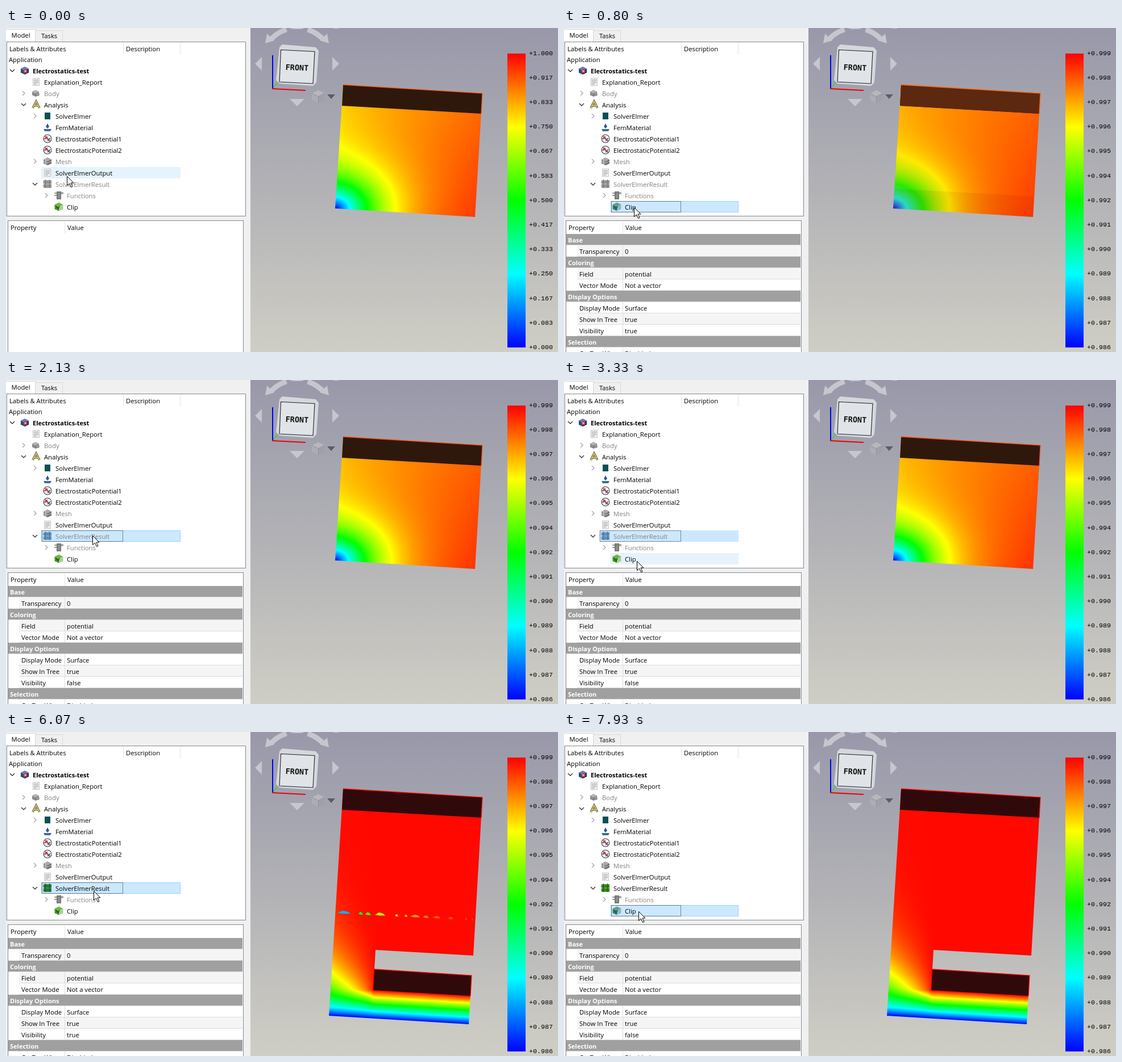
Animation, 971 px wide and 571 px high, one loop 8000 ms. Source, as an HTML page with a canvas:

```html
<!DOCTYPE html>
<html lang="en">
<head>
<meta charset="utf-8">
<title>Electrostatics-test</title>
<style>
html, body { margin: 0; width: 100%; height: 100%; overflow: hidden; background: #f0f0f0 }
canvas { display: block }
</style>
</head>
<body>
<canvas id="stage" width="971" height="571"></canvas>
<script>
const W = 971, H = 571, LOOP = 8000, STEP = 1000 / 15;
const UI = '11.25px "Open Sans", "Noto Sans", sans-serif';
const BOLD = 'bold 11px "Open Sans", "Noto Sans", sans-serif';
const MONO = '11.67px "Liberation Mono", monospace';
let g = document.getElementById('stage').getContext('2d');

const clamp = (v, a = 0, b = 1) => Math.min(b, Math.max(a, v));
const lerp = (a, b, k) => a + (b - a) * k;

function rect(x, y, w, h, color) { g.fillStyle = color; g.fillRect(x, y, w, h); }
function frame(x, y, w, h, color) { g.lineWidth = 1; g.strokeStyle = color; g.strokeRect(x + .5, y + .5, w - 1, h - 1); }
function text(s, x, y, color = '#000', font = UI) { g.font = font; g.fillStyle = color; g.fillText(s, x, y); }
function trace(p, close = true) {
  g.beginPath();
  for (let i = 0; i < p.length; i += 2) g.lineTo(p[i], p[i + 1]);
  if (close) g.closePath();
}
function poly(p, color) { trace(p); g.fillStyle = color; g.fill(); }
function line(p, color, width = 1, close = false) {
  trace(p, close); g.strokeStyle = color; g.lineWidth = width; g.stroke();
}
function disc(x, y, r, color) { g.beginPath(); g.arc(x, y, r, 0, 7); g.fillStyle = color; g.fill(); }
function layer(draw) {
  const c = document.createElement('canvas'), main = g;
  c.width = W; c.height = H;
  g = c.getContext('2d');
  draw();
  g = main;
  return c;
}

// ---- potential field ----
const CLIP = [593, 100, 838, 115, 825, 333, 579, 318];
const FULL = [593, 100, 838, 115, 822, 394, 650, 384, 648, 418, 819, 429, 814, 515, 568, 500];
const TOP_BAR = [593, 100, 838, 115, 836, 151, 591, 137];
const LOW_BAR = [648, 418, 819, 429, 817, 465, 646, 455];

// coordinates along the lower and left edges of the clipped block
function toUV(x, y) {
  const dx = x - 579, dy = y - 318;
  return [(218 * dx + 14 * dy) / 53838, (15 * dx - 246 * dy) / 53838];
}
function clipField(u, v) {
  return .8 * Math.tanh(Math.hypot(u * 185, v * 218) / 65) + .15 * Math.max(0, u) ** .8 * (1 - .4 * v);
}
function fineClipField(u, v) {
  const p = clipField(u, v);
  return p + .12 * p * (1 - p);
}
function fullField(u, v) {
  const d = Math.max(0, (v + .835) * 218), side = clamp((.307 - u) / .307);
  const blend = side ** clamp(.4 + d / 150, .5, 2);
  return lerp(Math.min(1, d / 50), 1 - Math.exp(-d / 55), blend) - .008;
}
function rainbow(p) {
  const q = 4 * clamp(p);
  return [clamp(q - 2), clamp(Math.min(q, 4 - q)), clamp(2 - q)].map(c => Math.round(255 * c));
}
function fieldImage(field) {
  return layer(() => {
    const x0 = 560, y0 = 95, w = 285, h = 425, img = g.createImageData(w, h);
    for (let y = 0, i = 0; y < h; y++) for (let x = 0; x < w; x++, i += 4) {
      img.data.set([...rainbow(field(...toUV(x0 + x, y0 + y))), 255], i);
    }
    g.putImageData(img, x0, y0);
  });
}
function block(shape, field, barColor, edge, bars) {
  const image = fieldImage(field);
  return layer(() => {
    g.save(); trace(shape); g.clip(); g.drawImage(image, 0, 0); g.restore();
    for (const bar of bars) { poly(bar, barColor); line(bar.slice(0, 6), edge, 1.3); }
  });
}
const coarseClip = block(CLIP, clipField, '#2e180c', '#ff5a14', [TOP_BAR]);
const fineClip = block(CLIP, fineClipField, '#2e180c', '#ff4a10', [TOP_BAR]);
const fullBlock = block(FULL, fullField, '#300a0a', '#ff0808', [TOP_BAR, LOW_BAR]);
const clearClip = layer(() => {
  g.drawImage(fineClip, 0, 0);
  poly(CLIP, 'rgba(255,110,0,.15)');
  poly(TOP_BAR, '#5c2810');
  poly([581, 283, 827, 297, 825, 333, 579, 318], 'rgba(110,10,0,.08)');
  line(TOP_BAR.slice(0, 6), '#ff6a10', 1.3);
});
// slivers of the clipped face that show through the full block
const slivers = layer(() => {
  const spans = [583, 23, 620, 8, 632, 10, 649, 18, 684, 6, 701, 5, 711, 17, 733, 11, 751, 13, 777, 10, 807, 4, 819, 3];
  for (let i = 0; i < spans.length; i += 2) {
    const x = spans[i], w = spans[i + 1], y = 317.5 + (x - 579) * .05, h = x < 670 ? 4 : 3;
    poly([x, y + 1, x + w * .4, y - h + 1, x + w * .8, y - 1, x + w, y + 2.5, x + w * .4, y + 2.5],
      `rgb(${rainbow(fineClipField((x + w / 2 - 579) / 246, 0))})`);
  }
});

// ---- tree ----
const ROWS = [
  ['Application', 5],
  ['Electrostatics-test', 47, 'open', docIcon],
  ['Explanation_Report', 67, '', pageIcon],
  ['Body', 67, 'shut', bodyIcon, true],
  ['Analysis', 67, 'open', analysisIcon],
  ['SolverElmer', 87, 'shut', solverIcon],
  ['FemMaterial', 87, '', materialIcon],
  ['ElectrostaticPotential1', 87, '', potentialIcon],
  ['ElectrostaticPotential2', 87, '', potentialIcon],
  ['Mesh', 87, 'shut', meshIcon, true],
  ['SolverElmerOutput', 87, '', pageIcon],
  ['SolverElmerResult', 87, 'open', resultIcon, true],
  ['Functions', 107, 'shut', functionIcon, true],
  ['Clip', 107, '', clipIcon]
];
const RESULT = 11, CLIP_ROW = 13;

function cube(x, y, r, top, left, right) {
  poly([x, y - r, x + r, y - r * .5, x, y, x - r, y - r * .5], top);
  poly([x - r, y - r * .5, x, y, x, y + r, x - r, y + r * .55], left);
  poly([x + r, y - r * .5, x, y, x, y + r, x + r, y + r * .55], right);
}
function docIcon(x, y) {
  cube(x, y, 7, '#5b7fb5', '#28487c', '#1b2f58');
  disc(x + 1, y + 1, 3.5, '#d8433a');
  disc(x + 1, y + 1, 1.3, '#f2d9d9');
}
function pageIcon(x, y) {
  rect(x - 6, y - 7, 12, 14, '#f2f2f0');
  frame(x - 6, y - 7, 12, 14, '#c2c2c0');
  for (let i = 0; i < 4; i++) rect(x - 4, y - 4 + i * 2.5, i === 3 ? 5 : 8, 1, '#999');
}
function bodyIcon(x, y) {
  cube(x - 1, y, 6, '#b5b5b5', '#8c8c8c', '#777');
  disc(x + 3, y + 2, 3, '#999');
}
function analysisIcon(x, y) {
  for (const [c, w] of [['#4a4418', 3.4], ['#efe08a', 1.6]]) {
    line([x - 6, y + 6, x, y - 6, x + 6, y + 6], c, w);
    line([x - 3, y + 2, x + 4, y + 2], c, w);
  }
}
function solverIcon(x, y) { rect(x - 5, y - 6, 10, 12, '#0d4f59'); }
function materialIcon(x, y) {
  poly([x - 7, y + 3, x + 7, y + 3, x + 5, y + 7, x - 5, y + 7], '#3b6ea5');
  poly([x, y - 7, x + 3, y - 1, x, y + 2, x - 3, y - 1], '#2a5d94');
}
function potentialIcon(x, y) {
  disc(x, y, 7.5, '#2b2b2b');
  disc(x, y, 6.5, '#fff');
  line([x - 4, y - 4, x + 4, y + 4], '#d22', 2.4);
  line([x - 5, y + 1, x, y - 4], '#d22', 1.6);
  line([x, y + 4, x + 5, y - 1], '#356fb0', 1.8);
  line([x - 7, y, x - 2, y], '#356fb0', 1.6);
}
function meshIcon(x, y) {
  cube(x, y, 7, '#aaa', '#888', '#6d6d6d');
  line([x - 7, y, x, y + 3, x + 7, y], '#d0d0d0');
  line([x - 3.5, y - 5, x - 3.5, y + 5], '#d0d0d0');
}
function gridIcon(x, y, fill, lines) {
  rect(x - 7, y - 7, 14, 14, fill);
  for (const d of [-3.5, 3.5]) {
    line([x + d, y - 8, x + d, y + 7], lines);
    line([x - 8, y + d, x + 7, y + d], lines);
  }
}
function resultIcon(x, y, s) {
  const picked = s.selected === RESULT;
  if (s.full) gridIcon(x, y, picked ? '#2f8a4e' : '#4a9a1e', '#174a16');
  else gridIcon(x, y, picked ? '#6d9cc6' : '#a2a2a2', picked ? '#41709c' : '#707070');
}
function functionIcon(x, y) {
  rect(x - 4, y - 7, 8, 14, '#777');
  rect(x - 8, y - 5, 4, 2, '#999');
  rect(x - 8, y - 1, 4, 2, '#999');
  rect(x + 4, y - 6, 4, 4, '#aaa');
  rect(x - 2, y - 5, 4, 10, '#8c8c8c');
}
function clipIcon(x, y, s) {
  const picked = s.selected === CLIP_ROW;
  cube(x, y, 7.5, picked ? '#5f9e8c' : '#6db83f', picked ? '#2f8a63' : '#3f9a22', picked ? '#8fb5cf' : '#a9cf94');
  line([x - 5, y - 1, x - 1, y + 4, x + 1, y - 1], '#1d4d18', 1.3);
}
function chevron(kind, x, y) {
  if (kind === 'open') line([x - 4, y - 2, x, y + 2, x + 4, y - 2], '#404040', 1.5);
  if (kind === 'shut') line([x - 2, y - 4, x + 2, y, x - 2, y + 4], '#a6a6a6', 1.3);
}
function drawTree(s) {
  ROWS.forEach(([label, x, state, icon, hidden], i) => {
    const top = 45 + 20 * i, left = x - 25, selected = i === s.selected, hover = i === s.hover;
    if (selected || hover) rect(left, top, 307 - left, 20, selected ? '#cce8ff' : '#e5f3fd');
    if (selected) {
      if (hover) frame(left, top, 307 - left, 20, '#99d1ff');
      g.setLineDash([1, 1]);
      frame(left + 1, top, 205 - left, 20, '#222');
      g.setLineDash([]);
    }
    chevron(state, x - 36, top + 10);
    if (icon) icon(x - 14, top + 10, s);
    const gray = hidden && !(i === RESULT && s.full);
    text(label, x, top + 15, gray ? '#808080' : '#000', i === 1 ? BOLD : UI);
  });
}

// ---- property table ----
function drawProperties(s) {
  const rows = [['Base'], ['Transparency', '0'], ['Coloring'], ['Field', 'potential'], ['Vector Mode', 'Not a vector'],
    ['Display Options'], ['Display Mode', 'Surface'], ['Show In Tree', 'true'], ['Visibility', String(s.visible)],
    ['Selection'], ['On Top When', 'Disabled']];
  rows.forEach(([name, value], i) => {
    const y = 363 + 20 * i;
    if (value) {
      if (i % 2) rect(23, y, 393, 19, '#f5f5f5');
      rect(103, y, 1, 20, '#dcdcdc');
      text(name, 27, y + 15);
      text(value, 107, y + 15);
    } else {
      rect(4, y, 412, 19, '#a0a0a0');
      text(name, 7, y + 15, '#fff', BOLD);
    }
    const left = value ? 23 : 4;
    rect(left, y + 19, 416 - left, 1, '#dcdcdc');
  });
}

// ---- still parts ----
const backdrop = layer(() => {
  rect(0, 0, W, H, '#f0f0f0');
  rect(52, 4, 48, 20, '#f0f0f0'); frame(51, 4, 49, 21, '#d9d9d9');
  rect(0, 2, 52, 23, '#fff'); frame(-1, 2, 53, 24, '#d9d9d9');
  text('Model', 9.5, 17); text('Tasks', 62, 18);
  rect(1, 24, 421, 308, '#fff'); frame(1, 24, 421, 308, '#828790');
  text('Labels & Attributes', 6, 41); text('Description', 211, 41);
  rect(206, 25, 1, 22, '#e2e2e2'); rect(306, 25, 1, 22, '#e2e2e2');
  rect(3, 339, 415, 240, '#fff'); frame(3, 339, 415, 240, '#828790');
  text('Property', 8, 356); text('Value', 108, 356);
  rect(103, 341, 1, 21, '#e2e2e2');

  const sky = g.createLinearGradient(0, 0, 0, H);
  sky.addColorStop(0, '#9898aa'); sky.addColorStop(.5, '#b2b2b6'); sky.addColorStop(1, '#cfcec5');
  rect(430, 0, 541, H, sky);
  drawCube();
  const ramp = g.createLinearGradient(0, 45, 0, 563);
  ['#f00', '#ff0', '#0f0', '#0ff', '#00f'].forEach((c, i) => ramp.addColorStop(i / 4, c));
  rect(882, 45, 32, 518, ramp);
});

function drawCube() {
  const pale = '#c6c6cf';
  poly([438, 63, 450, 51, 450, 75], pale);
  poly([586, 63, 574, 51, 574, 75], pale);
  poly([499, 125, 525, 125, 512, 138], pale);
  poly([499, 0, 525, 0, 519, 2, 505, 2], pale);
  g.strokeStyle = pale; g.lineWidth = 9;
  for (const [a, b] of [[-2.38, -1.87], [-1.27, -.76]]) {
    g.beginPath(); g.arc(512, 63, 63, a, b); g.stroke();
  }
  poly([456, 27, 459, 10, 472, 22], pale);
  poly([568, 27, 565, 10, 552, 22], pale);
  rect(576, 0, 10, 1, pale);
  line([470, 106, 480, 92], '#3fd23f', 2);
  poly([486, 29, 545, 34, 550, 40, 546, 96, 540, 102, 481, 98, 475, 92, 481, 34], '#d3d8dd');
  const face = [483.5, 38.5, 543, 41.5, 540, 98, 481, 95];
  poly(face, '#e0e4e8');
  line(face, '#222', 1.1, true);
  g.save();
  g.translate(512, 69); g.rotate(.04); g.textAlign = 'center';
  text('FRONT', 0, 5.5, '#111', 'bold 13.5px "DejaVu Sans Mono", monospace');
  g.restore();
  line([469, 48, 469, 107], '#0000f0', 2);
  line([468, 107, 527, 110], '#f00000', 2);
  cube(549.5, 121, 11.5, '#b6b6bc', '#acacb3', '#a0a0a8');
  line([538, 115, 549, 121, 561, 115], '#92929b');
  line([549.5, 121, 549.5, 132], '#92929b');
  poly([565, 117, 579, 117, 572, 125], '#5c5c66');
}

function drawLegend(low, high) {
  for (let i = 0; i < 13; i++) {
    const value = Math.max(0, lerp(high, low, i / 12) - 1e-6);
    text('+' + value.toFixed(3), 920, 47.5 + 43.2 * i, '#000', MONO);
  }
}

// ---- pointer: start step, end step, x, y ----
const MOVES = [[0, 6, 123, 316], [15, 20, 152, 274], [43, 50, 128, 319], [62, 65, 154, 280], [107, 108, 138, 306.5], [108, 109, 131, 316]];
function pointer(t) {
  const n = Math.floor((t + 4) / STEP);
  let x = 107, y = 261;
  for (const [from, to, nx, ny] of MOVES) {
    const k = clamp((n - from) / (to - from)), e = k * k * (3 - 2 * k);
    x = lerp(x, nx, e); y = lerp(y, ny, e);
  }
  return [Math.round(x), Math.round(y)];
}
function drawPointer(x, y) {
  const arrow = [0, 0, 0, 16, 4, 12.5, 7, 19, 9.5, 18, 6.5, 11.5, 11.5, 11.5];
  g.save(); g.translate(x + .5, y + .5);
  poly(arrow, '#fff'); line(arrow, '#000', 1, true);
  g.restore();
}

// value of the latest [time, value] pair that has begun
const at = (t, first, ...changes) => changes.reduce((v, [start, next]) => t >= start ? next : v, first);

function draw(t) {
  const [px, py] = pointer(t);
  const s = {
    selected: at(t, -1, [600, CLIP_ROW], [2000, RESULT], [3530, CLIP_ROW], [4800, RESULT], [7470, CLIP_ROW]),
    hover: Math.floor((py - 48) / 20),
    visible: at(t, true, [2130, false], [3600, true], [4870, false], [6070, true], [7930, false]),
    full: t >= 6070
  };
  g.drawImage(backdrop, 0, 0);
  drawTree(s);
  if (t >= 670) drawProperties(s);
  drawLegend(...(t < 670 ? [0, 1] : [.986, .999]));
  if (s.full) {
    g.drawImage(fullBlock, 0, 0);
    g.globalAlpha = at(t, 1, [7730, .5], [7930, 0]);
    g.drawImage(slivers, 0, 0);
    g.globalAlpha = 1;
  } else {
    g.drawImage(at(t, coarseClip, [670, fineClip], [730, clearClip], [1000, fineClip]), 0, 0);
  }
  drawPointer(px, py);
}

function tick() {
  draw(performance.now() % LOOP);
  requestAnimationFrame(tick);
}
tick();
</script>
</body>
</html>
```
